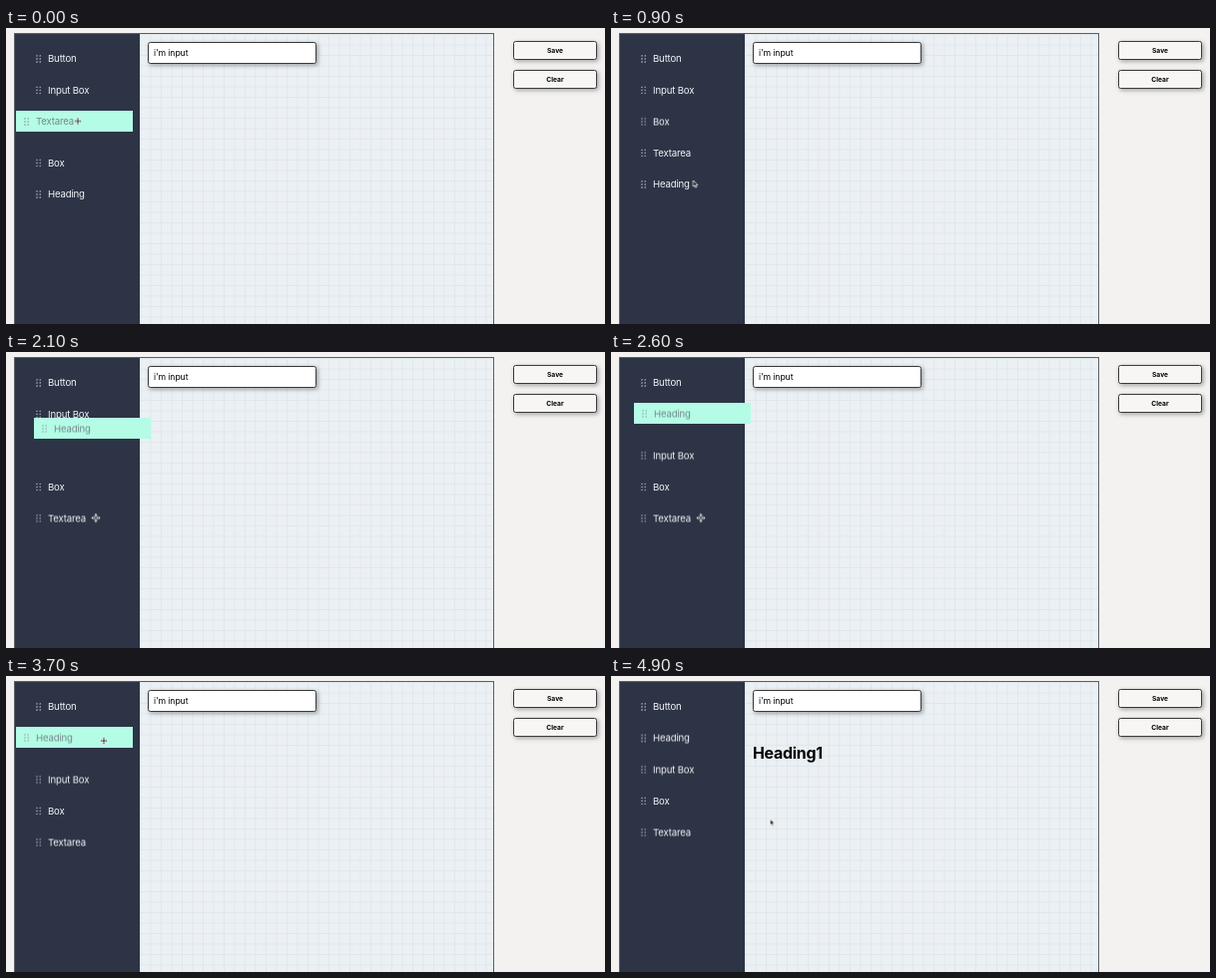
Write an HTML page that moves like this. It is 600 px wide and 297 px high and loops after 5 s.

```html
<!DOCTYPE html>
<html lang="en">
<head>
<meta charset="utf-8">
<title>Drag and drop page builder</title>
<style>
  html, body { margin: 0; width: 100%; height: 100%; overflow: hidden; }
  body { position: relative; background: #f3f2f1; font-family: Inter, "Liberation Sans", sans-serif; }
  body * { box-sizing: border-box; position: absolute; }

  .builder {
    left: 8px; top: 5px; width: 481px; height: 320px;
    border: 1px solid #596067;
    background-color: #ebf0f4;
    background-image:
      linear-gradient(90deg, #e0e7eb 1px, transparent 1px),
      linear-gradient(#e0e7eb 1px, transparent 1px);
    background-size: 10.5px 10.5px;
    background-position: 125px 0;
  }
  .sidebar { left: 9px; top: 6px; width: 125px; height: 300px; background: #2d3446; }

  .field, .button {
    border: 1px solid #3a3a3a; border-radius: 2.5px;
    box-shadow: 1.5px 1.5px 4px rgba(0, 0, 0, .35);
  }
  .field {
    left: 142px; top: 14px; width: 169px; height: 22px; padding-left: 5px;
    background: #fff; color: #000; font-size: 8.7px; letter-spacing: -.1px; line-height: 20px;
  }
  .button {
    left: 508px; width: 84px; height: 19px;
    background: #f7f6f4; color: #000;
    font-size: 6.7px; font-weight: 700; line-height: 18px; text-align: center;
  }
  .title {
    left: 142px; top: 67.5px; color: #000; white-space: nowrap;
    font-size: 15.9px; font-weight: 700; letter-spacing: -.25px; line-height: 20px;
  }

  .item {
    left: 22px; top: 0; width: 117px; height: 21px; padding-left: 20px;
    color: #f4f6f9; font-size: 9.6px; letter-spacing: -.16px; line-height: 21.5px; white-space: nowrap;
  }
  .item::before {
    content: ""; position: absolute; left: 7.5px; top: 6.6px; width: 5.4px; height: 8.4px;
    background: radial-gradient(circle at 1px 1px, #9298a5 .7px, transparent 1px) 0 0 / 3.4px 3.1px;
  }
  .drag { left: 0; background: #b4fce6; color: #73878a; }
  .drag::before { opacity: .8; }

  .item, .title, .cursor, .move, .arrow { animation: 5s linear infinite; }
  .button-item { transform: translateY(20px); }
  .input-item { animation-name: input-item; }
  .box-item { animation-name: box-item; }
  .text-item { animation-name: text-item; }
  .head-item { animation-name: head-item; }
  .text-drag { animation-name: text-drag; }
  .head-drag { animation-name: head-drag; }
  .title { animation-name: title; }

  .cursor { left: 0; top: 0; animation-name: cursor; }
  .cursor svg { overflow: visible; width: 10px; height: 10px; }
  .move { left: -5px; top: -5px; animation-name: move; }
  .arrow { left: -1.5px; top: -3.5px; animation-name: arrow; }

  @keyframes input-item {
    0%, 43.5% { transform: translateY(51.5px); animation-timing-function: ease-out; }
    48%, 78% { transform: translateY(93px); animation-timing-function: ease-out; }
    82%, 91.9% { transform: translateY(51.5px); }
    91.91%, 100% { transform: translateY(83px); }
  }
  @keyframes box-item {
    0%, 4% { transform: translateY(124.5px); animation-timing-function: ease-out; }
    8%, 35% { transform: translateY(83px); animation-timing-function: ease-out; }
    39%, 78% { transform: translateY(124.5px); animation-timing-function: ease-out; }
    82%, 91.9% { transform: translateY(83px); }
    91.91%, 100% { transform: translateY(114.5px); }
  }
  @keyframes text-item {
    0%, 13.9% { transform: translateY(114.5px); opacity: 0; }
    13.91%, 32% { transform: translateY(114.5px); opacity: 1; animation-timing-function: ease-out; }
    36%, 78% { transform: translateY(156px); animation-timing-function: ease-out; }
    82%, 91.9% { transform: translateY(114.5px); }
    91.91%, 100% { transform: translateY(146px); opacity: 1; }
  }
  @keyframes head-item {
    0%, 13.9% { transform: translateY(156px); opacity: 1; }
    13.91%, 29.9% { transform: translateY(146px); opacity: 1; }
    29.91%, 91.9% { transform: translateY(51.5px); opacity: 0; }
    91.91%, 100% { transform: translateY(51.5px); opacity: 1; }
  }
  @keyframes text-drag {
    0%, 1.9% { transform: translate(10px, 83px); }
    7.5% { transform: translate(26px, 128px); animation-timing-function: ease-out; }
    9.9%, 11.9% { transform: translate(23.5px, 115px); }
    13.9% { transform: translate(22px, 114.5px); opacity: 1; }
    13.91%, 100% { transform: translate(22px, 114.5px); opacity: 0; }
  }
  @keyframes head-drag {
    0%, 29.9% { transform: translate(22px, 142.5px); opacity: 0; }
    29.91%, 31.9% { transform: translate(22px, 142.5px); opacity: 1; }
    36% { transform: translate(23px, 122px); }
    40% { transform: translate(25px, 89px); }
    41.9%, 43% { transform: translate(28px, 66px); }
    47% { transform: translate(26px, 55px); }
    51.9%, 53.9% { transform: translate(23px, 51px); }
    60%, 75% { transform: translate(10px, 51px); }
    76% { transform: translate(56px, 62px); }
    78% { transform: translate(66px, 90px); }
    83%, 84% { transform: translate(71px, 130px); animation-timing-function: ease-out; }
    88% { transform: translate(143px, 58px); }
    90%, 91.9% { transform: translate(144px, 44px); opacity: 1; }
    91.91%, 100% { transform: translate(144px, 44px); opacity: 0; }
  }
  @keyframes title {
    0%, 91.9% { opacity: 0; }
    91.91%, 100% { opacity: 1; }
  }
  @keyframes cursor {
    0%, 1.9% { transform: translate(72px, 93.5px); }
    7.5% { transform: translate(75px, 139px); }
    9.9%, 13% { transform: translate(75px, 142.5px); }
    22%, 65.9% { transform: translate(90px, 166.5px); }
    65.91%, 75% { transform: translate(98px, 65px); }
    76% { transform: translate(144px, 76px); }
    78% { transform: translate(154px, 104px); }
    83%, 100% { transform: translate(160.5px, 146.5px); }
  }
  @keyframes move {
    0%, 9.8% { opacity: 1; }
    9.81%, 29.9% { opacity: 0; }
    29.91%, 83.9% { opacity: 1; }
    83.91%, 100% { opacity: 0; }
  }
  @keyframes arrow {
    0%, 9.8% { opacity: 0; }
    9.81%, 29.9% { opacity: 1; }
    29.91%, 83.9% { opacity: 0; }
    83.91%, 100% { opacity: 1; }
  }
</style>
</head>
<body>
  <div class="builder"></div>
  <div class="sidebar"></div>
  <div class="field">i'm input</div>
  <div class="title">Heading1</div>
  <div class="button" style="top: 13px">Save</div>
  <div class="button" style="top: 42px">Clear</div>

  <div class="item button-item">Button</div>
  <div class="item input-item">Input Box</div>
  <div class="item box-item">Box</div>
  <div class="item text-item">Textarea</div>
  <div class="item head-item">Heading</div>
  <div class="item drag text-drag">Textarea</div>
  <div class="item drag head-drag">Heading</div>

  <div class="cursor">
    <svg class="move" viewBox="-5 -5 10 10">
      <path d="M-3.2 0H3.2M0-3.2V3.2" stroke="#fff" stroke-width="2.2" stroke-linecap="round"/>
      <path d="M-2.8 0H2.8M0-2.8V2.8" stroke="#16202a" stroke-width=".9"/>
      <path d="M-3.7 0l1.5-1.3v2.6zM3.7 0l-1.5-1.3v2.6zM0-3.7l-1.3 1.5h2.6zM0 3.7l-1.3-1.5h2.6z" fill="#16202a" stroke="#fff" stroke-width=".4"/>
    </svg>
    <svg class="arrow" viewBox="0 0 10 10">
      <path d="M0 0V6.2L1.4 5L2.4 7.2L3.5 6.7L2.5 4.6H4.4Z" fill="#111" stroke="#fff" stroke-width=".8"/>
    </svg>
  </div>
</body>
</html>
```
